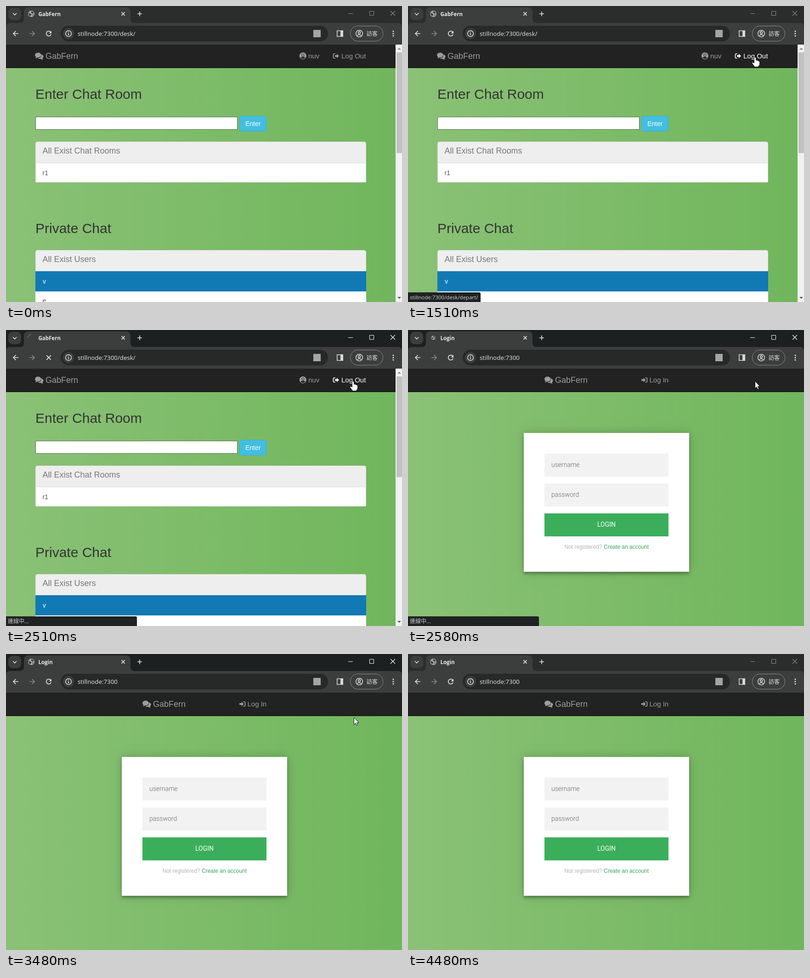
An HTML page with a canvas for the animation above (4.55 s loop, 862x644 px).

```html
<!DOCTYPE html>
<html lang="zh-Hant">
<head>
<meta charset="utf-8">
<title>GabFern</title>
<style>
html, body { margin: 0; width: 100%; height: 100%; overflow: hidden; background: #222; }
canvas { display: block; }
</style>
</head>
<body>
<canvas id="stage" width="862" height="644"></canvas>
<script>
const ctx = document.getElementById('stage').getContext('2d');
const W = 862, H = 644, LOOP = 4550;
const ARIAL = '"Liberation Sans", Arial, sans-serif';
const UI = '"Open Sans", "Noto Sans", sans-serif';
const ROBOTO = 'Roboto, sans-serif';
const CJK = '"Noto Sans CJK TC", "Noto Sans CJK", sans-serif';
const BRAND = 'GabFern', SITE = 'stillnode:7300';

// Number of steps taken since start, held between steps.
const steps = (t, start, n, gap = 70) =>
  Math.max(0, Math.min(n, Math.floor((t - start + 0.5) / gap) + 1));

function rect(x, y, w, h, color) {
  ctx.fillStyle = color;
  ctx.fillRect(x, y, w, h);
}

function round(x, y, w, h, r, fill, stroke) {
  ctx.beginPath();
  ctx.roundRect(x, y, w, h, r);
  if (fill) { ctx.fillStyle = fill; ctx.fill(); }
  if (stroke) { ctx.strokeStyle = stroke; ctx.lineWidth = 1; ctx.stroke(); }
}

function disc(x, y, r, color) {
  ctx.fillStyle = color;
  ctx.beginPath();
  ctx.arc(x, y, r, 0, Math.PI * 2);
  ctx.fill();
}

function ring(x, y, r, color, width, from = 0, to = Math.PI * 2) {
  ctx.strokeStyle = color;
  ctx.lineWidth = width;
  ctx.beginPath();
  ctx.arc(x, y, r, from, to);
  ctx.stroke();
}

function text(str, x, y, font, color, align = 'left') {
  ctx.font = font;
  ctx.fillStyle = color;
  ctx.textAlign = align;
  ctx.fillText(str, x, y);
}

function stroke(path, color, width) {
  ctx.strokeStyle = color;
  ctx.lineWidth = width;
  ctx.stroke(new Path2D(path));
}

function fill(path, color) {
  ctx.fillStyle = color;
  ctx.fill(new Path2D(path));
}

function at(x, y, draw, scale = 1) {
  ctx.save();
  ctx.translate(x, y);
  ctx.scale(scale, scale);
  draw();
  ctx.restore();
}

function cross(x, y, r, color, width) {
  stroke(`M${x - r} ${y - r}L${x + r} ${y + r}M${x + r} ${y - r}L${x - r} ${y + r}`, color, width);
}

function globe(scale) {
  at(55, 17, () => {
    disc(0, 0, 7, '#a4a8ab');
    fill('M-5.5 -2.5Q-3 -1 -1 0Q1 1 0 3Q-2 3 -2 5.5Q-5 4 -5.5 1Z', '#3c3d3d');
    fill('M0 -5.5Q4 -5.5 5.5 -2Q4 0 2 -.5Q2 -2 -.5 -2.5Z', '#3c3d3d');
    fill('M3 2L5.3 1.6Q4.5 4 2.5 5Z', '#3c3d3d');
  }, scale);
}

function titleBar(title, active, loading, iconScale, t) {
  rect(0, 0, W, 84, active ? '#1d2020' : '#2b2c2c');
  round(0, 37, W, 60, [8, 8, 0, 0], '#3c3d3d');
  fill('M30 37Q39 37 39 28V13Q39 3 49 3H261Q271 3 271 13V28Q271 37 280 37Z', '#3c3d3d');
  round(5, 4, 28, 27, 9, '#3c3d3d');
  stroke('M15 15.5L19 19.5L23 15.5', '#e3e3e3', 1.6);
  if (loading) {
    const a = Math.PI * (1 + (2510 - t) / 500);
    ring(55, 17, 7, '#696c6e', 1.5, a, a + Math.PI / 2);
  } else globe(iconScale);
  text(title, 70.5, 22, `bold 11.5px ${UI}`, '#e8eaea');
  cross(255, 17, 3.6, '#e3e3e3', 1.5);
  stroke('M286 17H296M291 12V22', '#e3e3e3', 1.6);

  const caption = active ? '#fff' : '#8b8b8b';
  stroke('M745 16.5H755M791.5 11.5H800.5V20.5H791.5Z', caption, 1);
  cross(842, 16, 5, caption, 1.1);
}

function toolbar(url, loading) {
  stroke('M27 60H16M21.5 54.5L16 60L21.5 65.5', '#e3e3e3', 1.7);
  stroke('M51 60H62M56.5 54.5L62 60L56.5 65.5', '#858787', 1.7);
  if (loading) cross(93, 60, 4.8, '#e3e3e3', 1.7);
  else {
    ring(93, 60, 5.3, '#e3e3e3', 1.7, 0.3, 5.5);
    fill('M99 54V59.5H93.5Z', '#e3e3e3');
  }
  round(119, 43, 582, 34, 17, '#272828');
  disc(136, 60, 12, '#3c3d3d');
  ring(136, 60, 6.3, '#e3e3e3', 1.5);
  rect(135.2, 59, 1.6, 4.5, '#e3e3e3');
  rect(135.2, 56.4, 1.6, 1.6, '#e3e3e3');
  text(url, 156, 65, `13.3px ${UI}`, '#e8eaea');

  rect(669, 52, 16, 16, '#a3a5a5');
  stroke('M720.8 53.8H733.2V66.2H720.8Z', '#d8d8d8', 1.6);
  rect(728, 53, 6, 14, '#d8d8d8');
  round(749.5, 43.5, 71, 33, 16.5, null, '#8b8e8e');
  ring(769, 60, 7.3, '#e3e3e3', 1.5);
  ring(769, 58, 2.4, '#e3e3e3', 1.5);
  ring(769, 68, 5.5, '#e3e3e3', 1.5, 3.8, 5.62);
  text('訪客', 785, 64.5, `12px ${CJK}`, '#e3e3e3');
  for (const y of [55, 60, 65]) disc(843, y, 1.6, '#e3e3e3');
}

function pageBase(width) {
  const g = ctx.createLinearGradient(0, 0, width, 0);
  g.addColorStop(0, '#8ac176');
  g.addColorStop(1, '#70b65c');
  rect(0, 135, width, H - 135, g);
  rect(0, 84, width, 50, '#222');
  rect(0, 134, width, 1, '#080808');
}

function brand(x) {
  const c = '#9d9d9d';
  at(x, 101, () => {
    fill('M12 4Q19 5 18.5 9.5Q18 12 16 13L18 15.5Q14 15.5 12.5 14Q8 14.5 6 12.5Q14 12 14 6Z', c);
    fill('M7 0.5C11 .5 13.5 3 13.5 5.8C13.5 9 10 11.5 5.5 11Q3.5 12.7 1 12.7L2.5 10C-2 7 0 .5 7 .5Z', c);
  });
  text(BRAND, x + 23, 115, `18px ${ARIAL}`, c);
}

function doorIcon(x, leaving, color) {
  at(x, 103, () => {
    if (leaving) {
      stroke('M5.5 1H2.5Q1 1 1 2.5V9Q1 10.5 2.5 10.5H5.5', color, 1.7);
      fill('M4.5 4H8.5V1L13.5 5.8L8.5 10.5V7.5H4.5Z', color);
    } else {
      stroke('M8 1H11Q12.5 1 12.5 2.5V9Q12.5 10.5 11 10.5H8', color, 1.7);
      fill('M0 4H4.5V1L9.5 5.8L4.5 10.5V7.5H0Z', color);
    }
  });
}

function panel(y, head, title) {
  round(64.5, y + 0.5, 719, 200, [4, 4, 0, 0], '#eee', '#ddd');
  text(title, 79.5, y + 26, `18px ${ARIAL}`, '#777');
  rect(64, y + head, 720, 1, '#ddd');
}

function chatPage(hover) {
  pageBase(848);
  brand(63);
  disc(646.3, 108.5, 7.6, '#9d9d9d');
  disc(646.3, 106.5, 3.1, '#222');
  fill('M641.2 112.8Q643 109.8 646.3 110.6Q649.6 109.8 651.4 112.8Q646.3 117 641.2 112.8Z', '#222');
  disc(646.3, 106.5, 2.3, '#9d9d9d');
  text('nuv', 658, 114, `15px ${ARIAL}`, '#9d9d9d');
  const link = hover ? '#fff' : '#9d9d9d';
  doorIcon(711.5, true, link);
  text('Log Out', 730, 114, `15px ${ARIAL}`, link);

  text('Enter Chat Room', 64, 202, `30px ${ARIAL}`, '#333');
  rect(64, 241, 440, 28, '#5e6a5a');
  rect(65, 242, 438, 26, '#fff');
  round(508.5, 239.5, 58, 33, 4, '#42bee0', '#38b0d6');
  text('Enter', 521, 261, `14px ${ARIAL}`, '#fff');

  ctx.save();
  ctx.beginPath();
  ctx.roundRect(64, 295, 720, 89, 4);
  ctx.clip();
  panel(295, 46, 'All Exist Chat Rooms');
  rect(64, 342, 720, 42, '#fff');
  stroke('M64.5 342V383.5H783.5V342', '#ddd', 1);
  ctx.restore();
  text('r1', 79.5, 368, `14px ${ARIAL}`, '#555');

  text('Private Chat', 64, 494, `30px ${ARIAL}`, '#333');
  panel(531, 46, 'All Exist Users');
  rect(64, 577, 720, 44, '#117ab5');
  text('v', 80, 604, `14px ${ARIAL}`, '#fff');
  rect(64, 621, 720, 23, '#fff');
  text('e', 79.5, 646, `14px ${ARIAL}`, '#555');

  rect(848, 84, 14, 560, '#f1f1f1');
  rect(850, 101, 12, 219, '#c1c1c1');
  fill('M852 95L856 91L860 95Z', '#888');
  fill('M852 633L856 637L860 633Z', '#505050');
}

function loginPage() {
  pageBase(W);
  brand(297);
  doorIcon(508, false, '#9d9d9d');
  text('Log In', 525.5, 114, `15px ${ARIAL}`, '#9d9d9d');

  for (const [blur, dy, alpha] of [[20, 0, 0.2], [5, 5, 0.24]]) {
    ctx.save();
    ctx.shadowColor = `rgba(0,0,0,${alpha})`;
    ctx.shadowBlur = blur;
    ctx.shadowOffsetY = dy;
    rect(252, 224, 360, 302, '#fff');
    ctx.restore();
  }
  rect(297, 269, 270, 50, '#f2f2f2');
  rect(297, 334, 270, 50, '#f2f2f2');
  text('username', 312, 298, `300 14px ${ROBOTO}`, '#666');
  text('password', 312, 363, `300 14px ${ROBOTO}`, '#666');
  rect(297, 399, 270, 50, '#3bae5b');
  text('LOGIN', 432, 428, `14px ${ROBOTO}`, '#fff', 'center');
  text('Not registered?', 340.5, 476, `12px ${ARIAL}`, '#b3b3b3');
  text('Create an account', 426, 476, `12px ${ARIAL}`, '#35a757');
}

function status(t, loading) {
  const shown = Math.max(0, steps(t, 820, 7) - 2) / 5;
  const alpha = shown * (1 - steps(t, 2920, 3) / 3);
  if (!alpha) return;
  ctx.globalAlpha = alpha;
  round(-1, 623, loading ? 286 : 159, 22, [0, 3, 0, 0], '#1f2222');
  if (loading) text('連線中...', 4, 638, `12px ${CJK}`, '#c8cacc');
  else text(SITE + '/desk/depart/', 4, 638, `11.5px ${UI}`, '#d6d8da');
  ctx.globalAlpha = 1;
}

function pointer(path, x, y, edge) {
  at(x, y, () => {
    ctx.lineJoin = 'round';
    fill(path, '#fff');
    stroke(path, edge, 1);
  });
}

const arrow = (x, y) =>
  pointer('M.5 .5V16L4 12.7L6.3 18L8.8 17L6.5 11.8H11Z', x, y, '#111');
const hand = (x, y) => {
  pointer('M-2 2Q0 -1 2 2V7Q4 6 5 8Q7 7 8 9Q10 9 10 11V15Q10 18 7.5 19.5V21.5H-1.5V20Q-4 17.5 -6.5 13.5Q-6 10.5 -2 13Z', x, y, '#222');
};

function cursor(t) {
  let k;
  if (t < 390) return;
  if (t < 820) {
    const p = 1 - (1 - (steps(t, 390, 5) - 1) / 4) ** 1.5;
    arrow(812 - 71 * p, 258 - 111 * p);
  } else if (t < 890) hand(748, 98.5);
  else if (t < 1370) hand(750 + 0.7 * (steps(t, 890, 6) - 1), 107);
  else if (t < 2580) {
    k = steps(t, 1370, 3) / 3;
    hand(754 + 1.5 * k, 107 + 4 * k);
  } else if (t < 3880) {
    k = steps(t, 3350, 8, 65.5) / 8;
    arrow(755 + 14 * k * k, 111 + 78 * k ** 1.1);
  } else if (t < 3950) arrow(790, 325);
  else if (t < 4020) arrow(820, 504);
}

function draw(t) {
  const login = t >= 2580;
  const busy = t >= 2245;
  const loading = busy && !login;
  const active = t >= 2110 && t < 4480;
  const iconScale = login ? 0.65 + 0.175 * steps(t, 2650, 2) : 1;
  ctx.clearRect(0, 0, W, H);
  titleBar(login ? 'Login' : BRAND, active, loading, iconScale, t);
  toolbar(login ? SITE : SITE + '/desk/', loading);
  if (login) loginPage();
  else chatPage(t >= 820);
  status(t, busy);
  cursor(t);
}

const start = performance.now();
function tick() {
  draw((performance.now() - start) % LOOP);
  requestAnimationFrame(tick);
}
tick();
</script>
</body>
</html>
```
